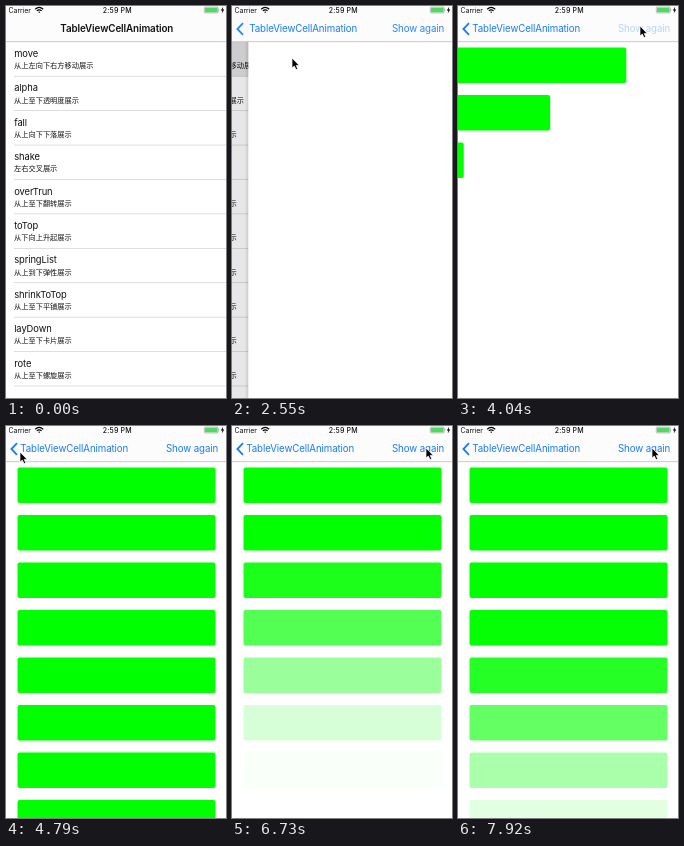
An HTML page that plays this animation: 220 px wide and 392 px high, repeating every 8000 ms.

```html
<!DOCTYPE html>
<html lang="en">
<head>
<meta charset="utf-8">
<title>Table view cell animation</title>
<style>
html, body { margin: 0; width: 100%; height: 100%; overflow: hidden; background: #fff; }
svg { display: block; width: 220px; height: 392px; }
text { font-family: Inter, Roboto, sans-serif; font-size: 9.7px; letter-spacing: -.01em; fill: #111; }
.name { font-size: 9.4px; }
.note { font-family: "Noto Sans CJK SC", "Noto Sans CJK", sans-serif; font-size: 7.22px; letter-spacing: 0; }
.status { font-size: 7px; }
.clock { font-weight: 500; letter-spacing: .03em; }
.bold { font-size: 9.8px; font-weight: 600; }
.blue { fill: #1a7cf5; }
</style>
</head>
<body>
<svg viewBox="0 0 220 392">
  <defs>
    <linearGradient id="shade">
      <stop offset="0" stop-opacity="0"/>
      <stop offset="1" stop-opacity=".12"/>
    </linearGradient>
  </defs>
  <g id="list"><rect width="220" height="392" fill="#fff"/></g>
  <rect id="dim" width="220" height="392"/>
  <g id="page">
    <rect x="-4" width="4" height="392" fill="url(#shade)"/>
    <rect width="220" height="392" fill="#fff"/>
  </g>

  <rect width="220" height="36" fill="#fcfcfc" fill-opacity=".92"/>
  <rect y="35.5" width="220" height=".6" fill="#aaa"/>
  <text class="status" x="2.5" y="6.6">Carrier</text>
  <g fill="none" stroke="#000" stroke-width="1.2">
    <path d="M29.2 3.2Q33.2 -.4 37.2 3.2M30.8 4.9Q33.2 2.8 35.6 4.9"/>
    <path d="M33.2 7.1l-1-1.1q1-.8 2 0z" fill="#000" stroke="none"/>
  </g>
  <text class="status clock" x="111.3" y="6.6" text-anchor="middle">2:59 PM</text>
  <rect x="198.3" y="1.1" width="14" height="5.8" rx="1.2" fill="#fff" stroke="#777" stroke-width=".5"/>
  <rect x="199" y="1.8" width="12.6" height="4.4" rx=".6" fill="#4cd964"/>
  <path d="M212.9 3q1 1 0 2z" fill="#777"/>
  <path d="M217.2 .8l-2.4 3.6h1.6l-.7 3 2.6-3.8h-1.6z"/>

  <text id="title" class="bold" y="26.4">TableViewCellAnimation</text>
  <text id="back" class="blue" y="26.4">TableViewCellAnimation</text>
  <path id="chevron" d="M11 17.2L5.4 23 11 28.8" fill="none" stroke="#1a7cf5" stroke-width="1.8"/>
  <text id="again" class="blue" x="160" y="26.4">Show again</text>
  <path id="cursor" d="M0 0V10L2.3 8 4 11.6 5.7 10.9 4.2 7.4H7.2Z" stroke="#fff" stroke-width=".7"/>
</svg>
<script>
const LOOP = 8000;
const $ = id => document.getElementById(id);
const clamp = v => Math.min(1, Math.max(0, v));
const mix = (a, b, p) => a + (b - a) * p;
const smooth = p => p * p * (3 - 2 * p);

function add(parent, tag, attrs, text = "") {
  const node = document.createElementNS("http://www.w3.org/2000/svg", tag);
  for (const key in attrs) node.setAttribute(key, attrs[key]);
  node.textContent = text;
  return parent.appendChild(node);
}
const set = (id, key, value) => $(id).setAttribute(key, value);
const shift = (node, x, y = 0) => node.setAttribute("transform", `translate(${x} ${y})`);

// List rows
const items = [
  ["move", "从上左向下右方移动展示"],
  ["alpha", "从上至下透明度展示"],
  ["fall", "从上向下下落展示"],
  ["shake", "左右交叉展示"],
  ["overTrun", "从上至下翻转展示"],
  ["toTop", "从下向上升起展示"],
  ["springList", "从上到下弹性展示"],
  ["shrinkToTop", "从上至下平铺展示"],
  ["layDown", "从上至下卡片展示"],
  ["rote", "从上至下螺旋展示"]
];
const marks = items.map(([name, note], i) => {
  const y = 35.8 + 34.42 * i;
  const mark = add($("list"), "rect", { y, width: 220, height: 34.4, fill: "#d0d0d0" });
  add($("list"), "text", { class: "name", x: 8.2, y: y + 15.1 }, name);
  add($("list"), "text", { class: "note", x: 8, y: y + 26.3 }, note);
  add($("list"), "rect", { x: 8, y: y + 34.1, width: 212, height: .6, fill: "#c8c7cc" });
  return mark;
});

// Green cells
const cells = Array.from({ length: 8 }, (_, i) =>
  add($("page"), "rect", { x: 11.5, y: 41.5 + 47.5 * i, width: 198, height: 35.4, rx: 2, fill: "#0f0" }));

const PUSH_A = 2317, POP = 5020, PUSH_B = 5898;
const RELEASES = [3950, 7500];

// Critically damped slide of the navigation stack
function glide(ms) {
  const u = Math.max(0, ms) * .01826;
  return 1 - (1 + u) * Math.exp(-u);
}

// Underdamped spring, damping ratio 0.7 over 0.4 s
function spring(ms) {
  const s = Math.max(0, ms) / 1000, a = 17.3, w = 17.6, v = 1.43;
  return 1 - Math.exp(-a * s) * (Math.cos(w * s) + (a - v) / w * Math.sin(w * s));
}

// Ease-in-out, cubic-bezier(.42, 0, .58, 1)
function ease(p) {
  p = clamp(p);
  let lo = 0, hi = 1;
  for (let i = 0; i < 20; i++) {
    const u = (lo + hi) / 2;
    const x = 1.26 * u * (1 - u) * (1 - u) + 1.74 * u * u * (1 - u) + u ** 3;
    if (x < p) lo = u; else hi = u;
  }
  return smooth(lo);
}

// Cursor stops: time, x, y
const path = [
  [1480, 1, 139], [2100, 60, 52], [2800, 60, 52], [3600, 182, 20],
  [4490, 182, 20], [4780, 14, 26], [5100, 14, 26], [5680, 36, 91],
  [6080, 36, 91], [6600, 194, 22], [LOOP, 194, 22]
];
function pointer(t) {
  const i = Math.max(1, path.findIndex(stop => stop[0] >= t));
  const [t0, x0, y0] = path[i - 1], [t1, x1, y1] = path[i];
  const p = smooth(clamp((t - t0) / (t1 - t0)));
  return [mix(x0, x1, p), mix(y0, y1, p)];
}

const tickTime = k => 150 * k - 10 * Math.max(0, Math.floor((k - 8) / 15));
function snap(t) {
  let k = Math.ceil(t / 149);
  while (tickTime(k) > t) k--;
  return tickTime(k);
}

function draw(now) {
  const t = snap(now % LOOP);
  const second = t >= PUSH_B;
  const popping = t >= POP && !second;
  const p = second ? glide(t - PUSH_B)
    : popping ? 1 - glide(t - POP)
    : glide(t - PUSH_A);

  shift($("list"), -66 * p);
  shift($("page"), 220 * (1 - p));
  set("page", "visibility", p > .002 ? "visible" : "hidden");
  set("dim", "opacity", .1 * p);
  marks.forEach((mark, i) => {
    const on = i === 0 ? t >= PUSH_A && !second : i === 1 && second;
    mark.setAttribute("opacity", on ? (popping ? p / 2 : 1 - p ** 3 / 2) : 0);
  });

  const swap = clamp((p - .45) * 2.5);
  set("title", "x", mix(54.3, 14.3, p));
  set("back", "x", mix(54.3, 14.3, p));
  set("title", "opacity", 1 - swap);
  set("back", "opacity", swap);
  set("chevron", "opacity", p);

  const release = second ? RELEASES[1] : RELEASES[0];
  const pressed = t >= release - 100 && t < release + 350;
  set("again", "opacity", p * (pressed ? mix(.2, 1, ease((t - release) / 350)) : 1));

  const start = t >= release ? release : (second ? PUSH_B : PUSH_A) + 500;
  cells.forEach((cell, i) => {
    const ms = t - start;
    shift(cell, second ? 0 : 220 * (spring(ms - i * 37.5) - 1));
    cell.setAttribute("opacity", ms < 0 ? 0 : second ? ease((ms - i * 50) / 300) : 1);
  });

  shift($("cursor"), ...pointer(t));
  set("cursor", "opacity", t < 1500 ? 0 : 1);
}

let origin;
function frame(now) {
  origin ??= now;
  draw(now - origin);
  requestAnimationFrame(frame);
}
draw(0);
requestAnimationFrame(frame);
</script>
</body>
</html>
```
